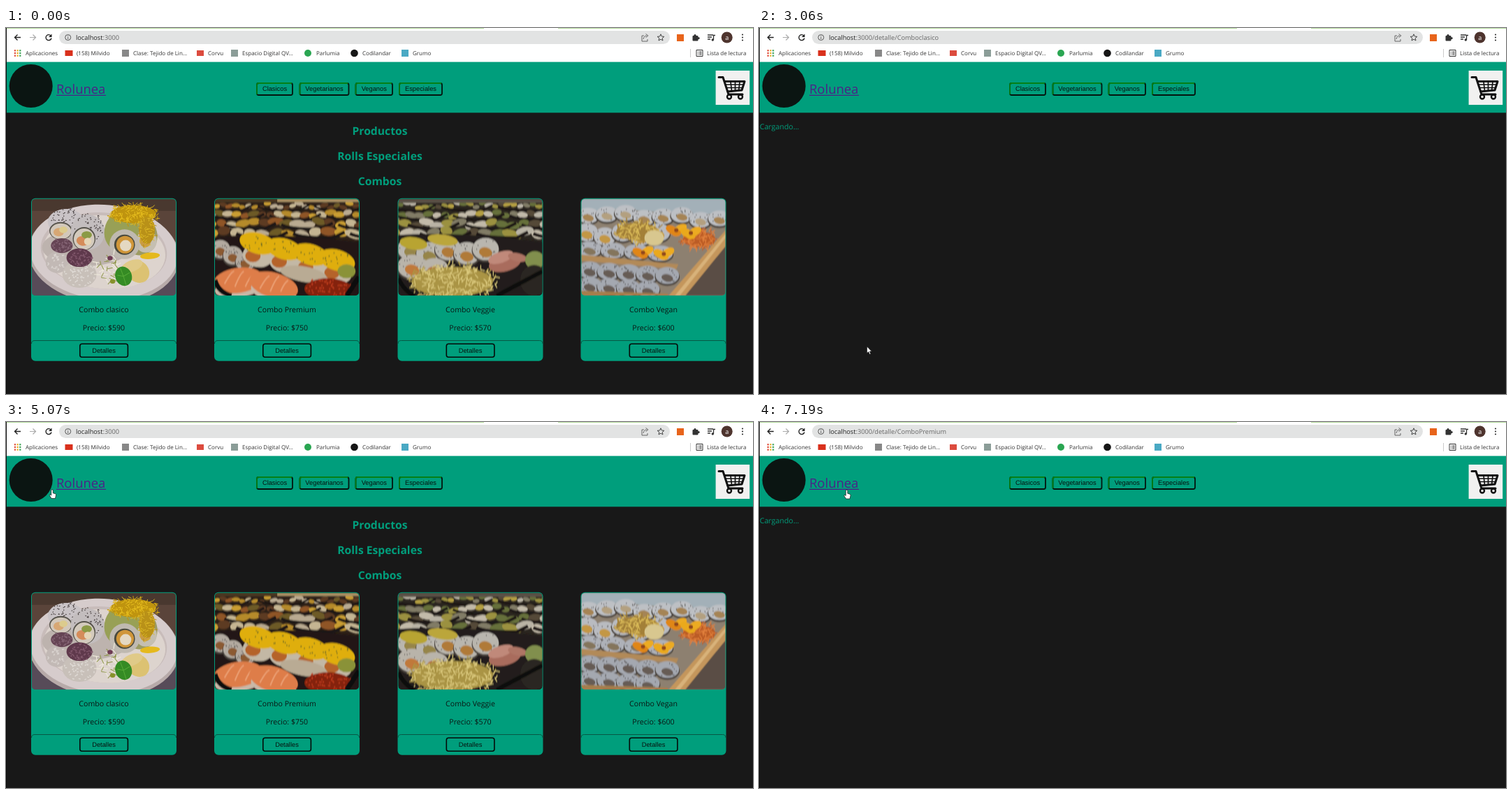
Write an HTML page that moves like this. It is 1069 by 524 pixels and loops after 8 s.

```html
<!DOCTYPE html>
<html lang="es">
<head>
<meta charset="utf-8">
<title>Combos</title>
<style>
html, body { margin: 0; width: 100%; height: 100%; overflow: hidden; background: #181818; }
svg { display: block; width: 100%; height: 100%; }
text { font-family: "Open Sans", "Noto Sans", sans-serif; text-rendering: geometricPrecision; }
.btn { font-family: "Liberation Sans", Arial, sans-serif; font-size: 9.3px; }
.sign { font-family: "Liberation Sans", Arial, sans-serif; font-size: 13px; }
.mark { font-size: 8px; }
.body { font-size: 10.6px; }
.head { font-size: 15.7px; font-weight: 700; }
</style>
</head>
<body>
<svg id="stage" viewBox="0 0 1069 524" preserveAspectRatio="none"></svg>
<script>
const GREEN = '#009e7c', DARK = '#181818', LOOP = 8000;

let seed = 7;
const rnd = () => {
  seed = (seed * 1664525 + 1013904223) % 4294967296;
  return seed / 4294967296;
};
const pick = list => list[Math.floor(rnd() * list.length)];

// Basic shapes
const rect = (x, y, w, h, fill, more = '') =>
  `<rect x="${x}" y="${y}" width="${w}" height="${h}" fill="${fill}" ${more}/>`;
const blob = (x, y, rx, ry, fill, turn = 0) =>
  `<ellipse cx="${x}" cy="${y}" rx="${rx}" ry="${ry}" fill="${fill}" transform="rotate(${turn} ${x} ${y})"/>`;
const dot = (x, y, r, fill) => blob(x, y, r, r, fill);
const path = (d, fill, more = '') => `<path d="${d}" fill="${fill}" ${more}/>`;
const line = (d, stroke, w = 1, more = '') =>
  `<path d="${d}" fill="none" stroke="${stroke}" stroke-width="${w}" ${more}/>`;
const text = (x, y, str, cls, fill = '#111', more = '') =>
  `<text x="${x}" y="${y}" class="${cls}" fill="${fill}" ${more}>${str}</text>`;
const MID = 'text-anchor="middle"';

// Short random strokes inside an ellipse
function specks(x, y, rx, ry, n, color, len = 1.5, w = 0.9) {
  let d = '';
  for (let i = 0; i < n; i++) {
    const a = rnd() * 6.283, r = Math.sqrt(rnd()), b = rnd() * 6.283;
    d += `M${(x + Math.cos(a) * r * rx).toFixed(1)} ${(y + Math.sin(a) * r * ry).toFixed(1)}` +
      `l${(Math.cos(b) * len).toFixed(1)} ${(Math.sin(b) * len).toFixed(1)}`;
  }
  return line(d, color, w);
}

function roll(x, y, rx, ry, core, rice = '#c6c3c2') {
  return blob(x, y + 2, rx + 1, ry + 1, '#4a433d') + blob(x, y, rx, ry, rice) +
    specks(x, y, rx * 0.9, ry * 0.9, 14, '#464241', 1.6, 1.1) +
    blob(x, y + ry * 0.3, rx * 0.5, ry * 0.45, core, 15);
}

const shreds = (x, y, rx, ry, n, light, deep) =>
  blob(x, y, rx * 0.9, ry * 0.85, deep) +
  specks(x, y, rx, ry, n, deep, 7, 1.5) + specks(x, y, rx, ry, n, light, 7, 1.3);

function plate() {
  return rect(0, 0, 278, 26, '#49382f') + rect(0, 150, 278, 59, '#574b58') +
    blob(139, 120, 146, 106, '#b7aaa9', 6) + blob(139, 115, 143, 102, '#d6cccc', 6) +
    blob(139, 112, 122, 82, '#c8bcba', 6) + blob(140, 115, 118, 79, '#ddd4ce', 6) +
    blob(105, 105, 85, 40, '#bdb3ae') +
    blob(66, 50, 35, 28, '#c9c3c6') + specks(70, 42, 34, 24, 60, '#4a4242', 2.5, 1.6) +
    blob(56, 69, 22, 19, '#55524a') + blob(56, 70, 20, 17, '#d2c8bb') +
    blob(52, 72, 10, 9, '#d7a774') + blob(61, 67, 8, 7, '#dccb8d') +
    blob(108, 72, 33, 38, '#c3bdbe') + specks(111, 62, 30, 32, 56, '#4a4242', 2.5, 1.6) +
    blob(101, 86, 22, 25, '#55524a') + blob(101, 87, 20, 23, '#d3cabd') +
    blob(98, 91, 12, 10, '#d58c5a', 20) + blob(106, 78, 10, 8, '#8b9a45') + blob(108, 92, 7, 8, '#e5d5b6') +
    blob(206, 78, 36, 44, '#9c9b62', -10) + blob(220, 91, 21, 25, '#c5bfb1') + blob(219, 90, 11, 15, '#c99b42') +
    blob(173, 70, 33, 43, '#98a056', 8) + blob(179, 98, 29, 32, '#bfb9b0') +
    blob(179, 99, 20, 22, '#4a4a3e') + blob(180, 99, 17, 19, '#d09639') + blob(181, 101, 11, 12, '#e4d8c2') +
    shreds(196, 33, 48, 23, 110, '#e8c01f', '#bf940f') + shreds(222, 68, 17, 34, 40, '#dfbb28', '#b99118') +
    blob(49, 137, 22, 23, '#c2b9b5') + blob(92, 163, 33, 29, '#c8c0b9') +
    specks(92, 163, 30, 27, 50, '#dfdad5', 4, 2) + specks(49, 138, 20, 20, 30, '#d9d3cf', 4, 2) +
    blob(58, 101, 21, 16, '#654454') + specks(58, 101, 20, 15, 40, '#836373', 4, 2) +
    blob(92, 127, 25, 20, '#5f394c') + specks(92, 127, 23, 18, 50, '#80576b', 4, 2) +
    blob(228, 123, 19, 7, '#e5b91d', -5) +
    blob(205, 157, 21, 25, '#dcc272', -25) + blob(193, 145, 22, 12, '#e0ca88', -25) +
    specks(152, 148, 27, 28, 24, '#eeeadb', 13, 1.6) + specks(150, 154, 24, 25, 20, '#8d9449', 10, 1.4) +
    dot(156, 178, 5, '#86922b') + dot(151, 128, 5, '#6d3b52') +
    blob(177, 167, 16, 21, '#358b24', -12) + line('M171 150Q177 166 182 186M165 165l12 2l12-8', '#56aa38', 1.4);
}

// Rows of filled boxes, growing toward the viewer
function trays(colors) {
  let out = '';
  for (let row = 0; row < 4; row++) {
    const y = 9 + row * 13, s = 7 + row * 2.5;
    for (let x = -6; x < 216; x += s * 1.3) {
      const lift = rnd() * 7 - 3;
      out += blob(x, y + lift, s * (0.6 + rnd() * 0.4), s * 0.45, pick(colors), rnd() * 40 - 20);
    }
    for (let x = -20 + row * 17; x < 208; x += 82) {
      out += line(`M${x} ${y + 2}Q${x + 12} ${y + 9} ${x + 58} ${y + 8}L${x + 74} ${y}`, '#1a1512', 3 + row * 0.6);
    }
  }
  return out;
}

function premium() {
  let out = trays(['#b9aa91', '#b58a2b', '#8f5526', '#c5b592', '#6d5a28', '#5d3a22', '#c99d32']) +
    rect(0, 0, 90, 5, '#4c3822') + rect(90, 0, 118, 5, '#aa9264') +
    path('M0 56Q60 46 208 62V139H0Z', '#211912');
  for (let i = 0; i < 3; i++) out += roll(8 + i * 18, 72 + i * 9, 14, 13, '#8b5a33', '#b3aaa0');
  for (let i = 0; i < 4; i++) {
    const x = 62 + i * 38, y = 64 + i * 8;
    out += blob(x, y + 18, 22, 16, '#c3b8a5', 10) + blob(x - 7, y + 18, 11, 9, '#b5642c') +
      blob(x, y, 27, 15, '#dfae10', 16) + specks(x, y, 22, 11, 14, '#6f6c20', 2, 1.5);
  }
  out += blob(190, 104, 13, 10, '#8a9238') + blob(128, 108, 34, 11, '#b9ab94', 10);
  [[34, 117, -8], [85, 124, 16]].forEach(([x, y, a]) => {
    out += blob(x, y + 11, 34, 14, '#c9b8a7', a) + blob(x, y, 36, 18, '#de7d48', a) +
      line(`M${x - 20} ${y + 5}q10-18 14-18M${x - 5} ${y + 9}q8-20 13-22M${x + 10} ${y + 9}q6-14 11-16`, '#eba074', 2);
  });
  return out + blob(163, 129, 34, 15, '#84210f') + specks(163, 127, 34, 15, 60, '#b93a1b', 2, 2.4) +
    line('M0 116Q5 134 24 139M208 112L190 139', '#0c0a09', 7);
}

function veggie() {
  let out = trays(['#b9b3a5', '#9b9140', '#b49f43', '#66703a', '#c2baa9', '#817b66', '#544a38']) +
    rect(0, 0, 208, 6, '#5a5147') + path('M0 52Q80 46 208 62V139H0Z', '#211e1a');
  for (let i = 0; i < 5; i++) out += roll(18 + i * 27, 72 + (i % 2) * 6, 19, 16, pick(['#b07a38', '#96854a']), '#b9b6ae');
  out += blob(22, 64, 20, 9, '#b8a433', 8) + blob(64, 59, 22, 8, '#bba63a', 8) +
    roll(20, 97, 21, 17, '#c0793a', '#b9b4aa') + roll(52, 100, 20, 15, '#b37440', '#b9b4aa') +
    blob(154, 92, 24, 12, '#a96c5d', -15) + blob(148, 84, 19, 8, '#c0897a', -18) + blob(172, 84, 14, 6, '#ae7565', 12) +
    blob(197, 88, 14, 13, '#818f4e') + blob(196, 117, 20, 22, '#2b2721');
  return out + shreds(78, 119, 65, 25, 190, '#dac87c', '#aa9444') +
    line('M0 114Q10 134 24 139M142 139L208 104', '#0f0e0c', 6);
}

function vegan() {
  let out = rect(0, 0, 208, 22, '#a3b0b8') + path('M0 24L40 14L208 26V139H0Z', '#8d8070') +
    path('M208 62V139H140Z', '#5a4d45');
  for (let i = 0; i < 8; i++) out += roll(10 + i * 27, 24 - (i % 3) * 3 + i, 16, 11, pick(['#a58454', '#b3a080']), '#bdc0c4');
  for (let i = 0; i < 5; i++) out += roll(8 + i * 26, 48 + (i % 2) * 6, 16, 13, '#c39745', '#b9bbc0');
  for (let i = 0; i < 4; i++) out += roll(12 + i * 34, 72 + i * 2, 18, 11, '#84745b', '#aeb1b8');
  out += shreds(81, 47, 34, 15, 80, '#d9b958', '#a38037') + shreds(170, 58, 26, 13, 70, '#e07f3b', '#bb5b25') +
    blob(105, 56, 14, 11, '#d8c78f') + path('M0 80L140 94L137 101L0 89Z', '#b28a58') +
    path('M208 45V68L150 139H126Z', '#c4965c') + path('M208 50V56L142 139H135Z', '#d8b27a');
  for (let i = 0; i < 9; i++) {
    out += roll(12 + (i % 5) * 28, 102 + Math.floor(i / 5) * 22 + (i % 5) * 2, 17, 12, '#665c55', '#a4a8b0');
  }
  [[137, 45], [158, 49], [89, 77], [119, 79]].forEach(([x, y], i) => {
    const c = i % 2 ? '#eaa91e' : '#e08616';
    out += blob(x - 6, y, 10, 6, c, 30) + blob(x + 6, y - 2, 10, 6, '#ecab22', -30) +
      blob(x, y + 4, 7, 5, c) + dot(x, y, 3, '#8f451d');
  });
  return out + path('M0 132L125 136V139H0Z', '#a67e4c');
}

// Photo: base tone under slightly softened shapes
const photo = (id, w, h, base, body) =>
  `<symbol id="${id}" viewBox="0 0 ${w} ${h}" preserveAspectRatio="none">` +
  rect(0, 0, w, h, base) + `<g filter="url(#soft)">${body}</g></symbol>`;
const image = (id, x, y, w, h) => `<use href="#${id}" x="${x}" y="${y}" width="${w}" height="${h}"/>`;

function browser() {
  let out = rect(0, 0, 1069, 49, '#fff') + rect(0, 0, 684, 1, '#b5dc9d') + rect(790, 0, 279, 1, '#b5dc9d') +
    rect(76, 4, 874, 19, '#e2e3e3', 'rx="9.5"') +
    line('M21 13.5H12.5M16.5 9.5l-4 4l4 4', '#222', 1.4) +
    line('M34 13.5H42.5M38.5 9.5l4 4l-4 4', '#aaa', 1.2) +
    line('M64.5 11.5A4 4 0 1 0 65 14.5', '#222', 1.4) + path('M65.5 8.5v4.5h-4.5z', '#222') +
    line('M84.7 13.5a4 4 0 1 0 8 0a4 4 0 1 0-8 0M88.7 13v2.8M88.7 11v1', '#555', 1) +
    text(100, 17, 'localhost<tspan id="tail" fill="#666"></tspan>', '', '#222', 'font-size="9.2"') +
    line('M913 11h-3v8h8v-3M912 16q1-5 5-5M915.5 8.5l3.5 2.5l-3.5 2.7', '#666') +
    line('M937 8.8l1.4 3.2l3.5.3l-2.7 2.3l.8 3.4l-3-1.8l-3 1.8l.8-3.4l-2.7-2.3l3.5-.3z', '#444') +
    rect(960, 9, 10, 10, '#e8641b') +
    rect(982.5, 11, 8, 7.5, '#333', 'rx="1"') + dot(986, 10.7, 1.7, '#333') + dot(991, 14.6, 1.7, '#333') +
    line('M1004 10h8M1004 13h6M1004 16h4M1012.5 17V10.5h2.5', '#333', 1.3) + dot(1011.3, 17, 1.7, '#333') +
    dot(1031.7, 13.5, 8, '#4e342e') + text(1031.7, 16.5, 'a', '', '#fff', MID + ' font-size="9"');
  for (let i = 0; i < 3; i++) out += dot(1054, 9.5 + i * 4, 1.1, '#333');
  const hues = ['#e04a38', '#e8ab1e', '#3aa257', '#4479d8'];
  for (let i = 0; i < 9; i++) {
    const row = Math.floor(i / 3);
    out += rect(11.8 + (i % 3) * 3.7, 31.2 + row * 3.7, 2.2, 2.2, hues[(i + row) % 4]);
  }
  out += rect(84.5, 32, 11, 8, '#d9301c') + rect(166, 31, 10, 10, '#888') + rect(273, 32, 10, 8, '#dc4b3e') +
    rect(322, 31, 10, 10, '#8b9d98') + dot(432, 36, 5, '#2aa652') + dot(498.5, 36, 5.3, '#161616') +
    rect(566, 31, 10, 10, '#4aa9c4');
  [[28, 'Aplicaciones'], [101, '(158) Milvido'], [182, 'Clase: Tejido de Lin...'], [289, 'Corvu'],
   [338, 'Espacio Digital QV...'], [444, 'Parlumia'], [510, 'Codilandar'], [582, 'Grumo'], [1003, 'Lista de lectura']]
    .forEach(([x, str]) => out += text(x, 39, str, 'mark', '#333'));
  return out + line('M979.5 30v12', '#ccc') +
    line('M988 31.5h9v9h-9zM990 34h1M990 36h1M990 38h1M992 34h3.5M992 36h3.5M992 38h3.5', '#333');
}

function navButton([x, w, label]) {
  return rect(x + 1, 79, w - 2, 17, GREEN, 'rx="2.5" stroke="#04150f" stroke-width="1.8"') +
    line(`M${x + 1} 95V81.5Q${x + 1} 79 ${x + 3.5} 79H${x + w - 2}`, '#058016', 1.8) +
    text(x + w / 2, 90.3, label, 'btn', '#06130f', MID);
}

function header() {
  const wheel = x => line(`M${x} 98.5a3 3 0 1 0 6 0a3 3 0 1 0-6 0`, '#111', 2.4);
  return rect(0, 48.6, 1069, 72.7, GREEN) + dot(35.7, 83, 31, '#0b1512') +
    `<g id="brand">${text(72, 93.5, 'Rolunea', '', 'currentColor', 'font-size="18.4"')}` +
    rect(72, 95.8, 71, 1.2, 'currentColor') + '</g>' +
    [[358, 53, 'Clasicos'], [419.5, 72, 'Vegetarianos'], [499.5, 54.5, 'Veganos'], [562, 63, 'Especiales']].map(navButton).join('') +
    rect(1015.6, 61, 48.6, 49, '#f1f1f0') +
    line('M1020 70.5H1026L1034 95H1054M1028.5 76.5H1057L1053 89L1032.5 91', '#111', 3, 'stroke-linejoin="round" stroke-linecap="round"') +
    line('M1029 81H1055M1031 85.5H1054M1037 77l1.5 13M1043.5 77v13M1050 77l-1.5 13', '#111', 1.7) +
    wheel(1032) + wheel(1048);
}

function card([x, id, name, price]) {
  const c = x + 104;
  return rect(x, 243.7, 208, 233, GREEN, 'rx="6"') +
    `<g clip-path="url(#clip-${id})">${image(id, x + 0.8, 244.5, 206.4, 138.8)}</g>` +
    text(c, 407, name, 'body', '#0b1714', MID) + text(c, 433, 'Precio: $' + price, 'body', '#0b1714', MID) +
    line(`M${x + 0.5} 452Q${x + 0.5} 447.5 ${x + 5} 447.5H${x + 203}Q${x + 207.5} 447.5 ${x + 207.5} 452`, '#075744') +
    rect(c - 34.2, 452.3, 68.6, 19, 'none', 'rx="3" stroke="#050b09" stroke-width="1.6"') +
    text(c, 464.8, 'Detalles', 'btn', '#07130f', MID);
}

const cards = [
  [36, 'plate', 'Combo clasico', 590], [298, 'premium', 'Combo Premium', 750],
  [560.5, 'veggie', 'Combo Veggie', 570], [822.5, 'vegan', 'Combo Vegan', 600]
];
const clips = cards.map(([x, id]) =>
  `<clipPath id="clip-${id}">${rect(x + 0.8, 244.5, 206.4, 138.8, '#000', 'rx="6"')}</clipPath>`).join('');

const home = text(535, 153, 'Productos', 'head', GREEN, MID) + text(535, 189, 'Rolls Especiales', 'head', GREEN, MID) +
  text(535, 225, 'Combos', 'head', GREEN, MID) + cards.map(card).join('');

const detail = image('plate', 245, 142, 278, 209) +
  text(586, 166, 'Combo clasico', 'body', GREEN) + text(586, 192, '12 piezas de rolls clasicos', 'body', GREEN) +
  text(586, 218, '$590', 'body', GREEN) +
  rect(586, 248, 21, 21, '#fb0000') + text(596.5, 262.5, '-', 'sign', '#fff', MID) +
  text(617, 263, '1', 'body', GREEN, MID) +
  rect(627, 248, 21, 20.5, '#008000') + line('M627.5 268V248.5H647.5', '#4d9c55') + line('M647.5 249V268H628', '#123f18') +
  text(637.5, 262.5, '+', 'sign', '#fff', MID) +
  rect(586.5, 270.5, 82, 15, '#f0f0f0', 'stroke="#777" rx="1"') + text(627.5, 281.2, 'Agregar al carrito', 'btn', '#000', MID);

const pages = { home, wait: text(1, 145, 'Cargando...', 'body', GREEN), detail };
const stage = document.getElementById('stage');
stage.innerHTML = '<defs><filter id="soft"><feGaussianBlur stdDeviation=".8"/></filter>' +
  photo('plate', 278, 209, '#5a443a', plate()) + photo('premium', 208, 139, '#2c2018', premium()) +
  photo('veggie', 208, 139, '#2a251f', veggie()) + photo('vegan', 208, 139, '#8d8070', vegan()) + clips + '</defs>' +
  rect(0, 0, 1069, 524, DARK) + browser() + header() +
  Object.entries(pages).map(([id, body]) => `<g id="${id}">${body}</g>`).join('') +
  rect(0, 0, 1, 524, '#0a0a0a') +
  '<g id="cursor"><circle id="halo" cy=".8" r="8.5" fill="#a9cf1c" opacity=".85"/>' +
  path('M0 0V9.6L2.2 7.6L3.8 11.2L5.4 10.5L3.8 7.1H6.8Z', '#fff', 'id="arrow" stroke="#111" stroke-width=".6"') +
  path('M-1.3 0a1.3 1.3 0 0 1 2.6 0V3.8L4.6 4.7Q5.8 5.1 5.5 7L4.5 11.5H-.9L-3.7 7.2Q-4 5.6-2.6 6L-1.3 7Z', '#fff',
    'id="hand" stroke="#111" stroke-width=".7"') + '</g>';

const el = id => document.getElementById(id);
const show = (id, on) => { el(id).style.display = on ? '' : 'none'; };

// Each move: start, end, destination, optional bend point
const start = [1037, 530];
const moves = [
  [350, 1120, [150, 467], [600, 210]],
  [1560, 1600, [149.5, 466]],
  [2130, 2450, [153, 460]],
  [2830, 3060, [154.5, 456]],
  [4220, 4780, [66, 98], [-15, 200]],
  [5100, 5720, [378.5, 451.5], [190, 330]],
  [5750, 5860, [390, 460]],
  [6180, 6860, [134.5, 110.5], [250, 250]],
  [6870, 6900, [136, 112]],
  [7090, 7190, [125.5, 98.5]]
];

function cursorAt(t) {
  let from = start;
  for (const [a, b, to, bend] of moves) {
    if (t < a) break;
    if (t < b) {
      const k = (t - a) / (b - a), u = k * k * (3 - 2 * k), v = 1 - u;
      return from.map((p, i) => {
        const q = bend ? bend[i] : (p + to[i]) / 2;
        return v * v * p + 2 * u * v * q + u * u * to[i];
      });
    }
    from = to;
  }
  return from;
}

const pageAt = t =>
  t < 1930 ? ['home', ''] : t < 3920 ? ['wait', 'Comboclasico'] : t < 5030 ? ['detail', 'Comboclasico'] :
  t < 6180 ? ['home', ''] : ['wait', 'ComboPremium'];
const within = (t, a, b) => t >= a && t < b;

function draw(t) {
  const [page, item] = pageAt(t), [x, y] = cursorAt(t);
  for (const id in pages) show(id, id === page);
  el('tail').textContent = ':3000' + (item && '/detalle/' + item);
  const onLink = y > 52 && x < 145 && y < (x < 68 ? 114 : 105);
  show('hand', onLink);
  show('arrow', !onLink);
  show('halo', within(t, 1850, 1930) || within(t, 4920, 5030) || within(t, 6060, 6180));
  el('brand').style.color = within(t, 4920, 5030) ? '#f01414' : '#4d2188';
  el('cursor').setAttribute('transform', `translate(${x.toFixed(2)} ${y.toFixed(2)})`);
}

const begin = performance.now();
function tick() {
  draw((performance.now() - begin) % LOOP);
  requestAnimationFrame(tick);
}
tick();
</script>
</body>
</html>
```
